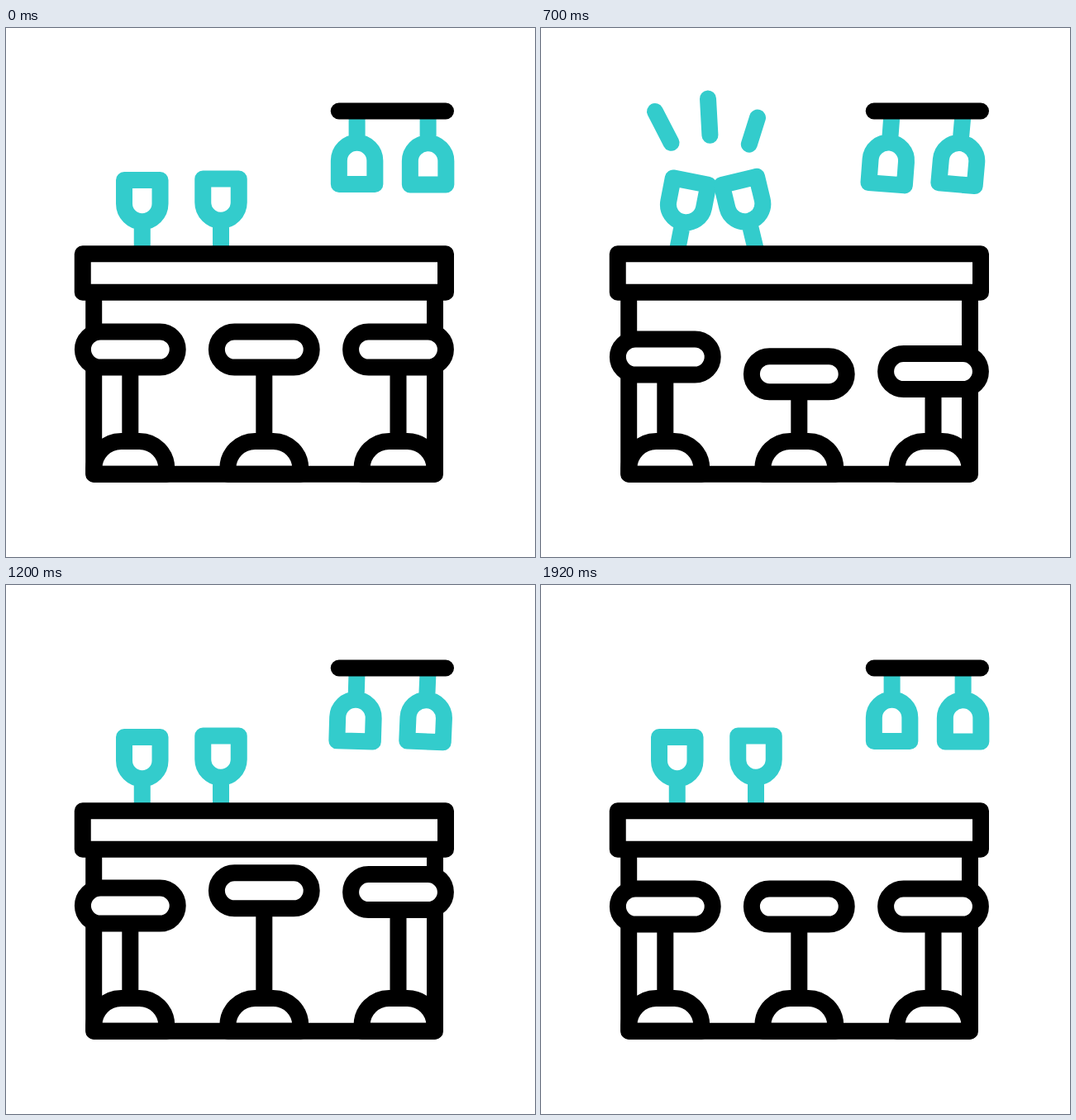
Write an HTML page that moves like this. It is 640 by 640 pixels and loops after 2.2 s.

```html
<!DOCTYPE html>
<html lang="en">
<head>
<meta charset="utf-8">
<title>Bar counter</title>
<style>
html, body { margin: 0; height: 100%; overflow: hidden; background: #fff; }
svg { display: block; width: 100%; height: 100%; }
.ink, .teal { fill: none; stroke: #000; stroke-width: 20; stroke-linejoin: round; }
.teal { stroke: #3cc; }
.solid { fill: #fff; }
.round { stroke-linecap: round; }
</style>
</head>
<body>
<svg viewBox="0 0 640 640">
  <defs>
    <!-- origin is the point the glass swings around -->
    <path id="glass" d="M0 -36V4.5M-21.75 -57.5V-86H21.75V-57.5A21.75 21.75 0 0 1 -21.75 -57.5Z"/>
  </defs>
  <g id="glasses" class="teal"></g>
  <g id="sparks" class="teal round"></g>
  <path class="ink round" d="M402.75 100.5H532"/>
  <path class="ink" d="M106.2 320V539.7H519V320"/>
  <rect class="ink solid" x="92.75" y="273.25" width="439.25" height="46.5"/>
  <g id="stools" class="ink"></g>
</svg>
<script>
const LOOP = 2200;
const $ = id => document.getElementById(id);

function add(parent, tag, attrs) {
  const el = document.createElementNS('http://www.w3.org/2000/svg', tag);
  for (const key in attrs) el.setAttribute(key, attrs[key]);
  return parent.appendChild(el);
}

// Eased value at time t through [time, value] keys
function track(keys, t) {
  if (t <= keys[0][0]) return keys[0][1];
  for (let i = 1; i < keys.length; i++) {
    const [t0, a] = keys[i - 1], [t1, b] = keys[i];
    if (t < t1) return a + (b - a) * (1 - Math.cos(Math.PI * (t - t0) / (t1 - t0))) / 2;
  }
  return keys[keys.length - 1][1];
}

const toast = angle => [[260, 0], [660, angle], [1120, 0]];
const sway = (a, b) => [[260, 0], [660, a], [910, -13], [1320, b], [1880, 0]];
const bounce = [[260, 0], [600, 32], [1080, -20], [1600, 0]];
const sparkHead = [[480, 0], [680, 1]];
const sparkTail = [[630, 0], [880, 1]];

const glasses = [
  { x: 164.75, y: 270, turn: 0, keys: toast(11.2) },
  { x: 260, y: 268.5, turn: 0, keys: toast(-13.8) },
  { x: 424.6, y: 103, turn: 180, keys: sway(5.5, 5.2) },
  { x: 510.6, y: 103.5, turn: 180, keys: sway(6.3, 6.1) }
].map(g => ({ ...g, el: add($('glasses'), 'use', { href: '#glass' }) }));

const stools = [[150.3, 320], [312.3, 160], [474.5, 0]].map(([x, delay]) => {
  const g = add($('stools'), 'g', { transform: `translate(${x} 0)` });
  add(g, 'path', { d: 'M-44 539.7V533A33 33 0 0 1 -11 500H11A33 33 0 0 1 44 533V539.7Z' });
  return {
    delay,
    pole: add(g, 'path', {}),
    seat: add(g, 'rect', { class: 'solid', x: -57.4, width: 114.8, height: 43, rx: 21.5 })
  };
});

const sparks = [
  [162, 147.5, 138, 101],
  [205, 140, 202, 85.5],
  [249.5, 148, 262, 108.5]
].map(([x0, y0, x1, y1]) => ({
  el: add($('sparks'), 'path', {}),
  at: u => `${x0 + (x1 - x0) * u} ${y0 + (y1 - y0) * u}`
}));

function draw(t) {
  for (const { el, x, y, turn, keys } of glasses)
    el.setAttribute('transform', `translate(${x} ${y}) rotate(${turn + track(keys, t)})`);

  for (const { delay, pole, seat } of stools) {
    const y = 367.5 + track(bounce, t - delay);
    seat.setAttribute('y', y);
    pole.setAttribute('d', `M0 ${y + 43}V500`);
  }

  const head = track(sparkHead, t), tail = track(sparkTail, t);
  for (const { el, at } of sparks)
    el.setAttribute('d', head > tail ? `M${at(tail)}L${at(head)}` : '');
}

const start = performance.now();
function tick() {
  draw((performance.now() - start) % LOOP);
  requestAnimationFrame(tick);
}
tick();
</script>
</body>
</html>
```
